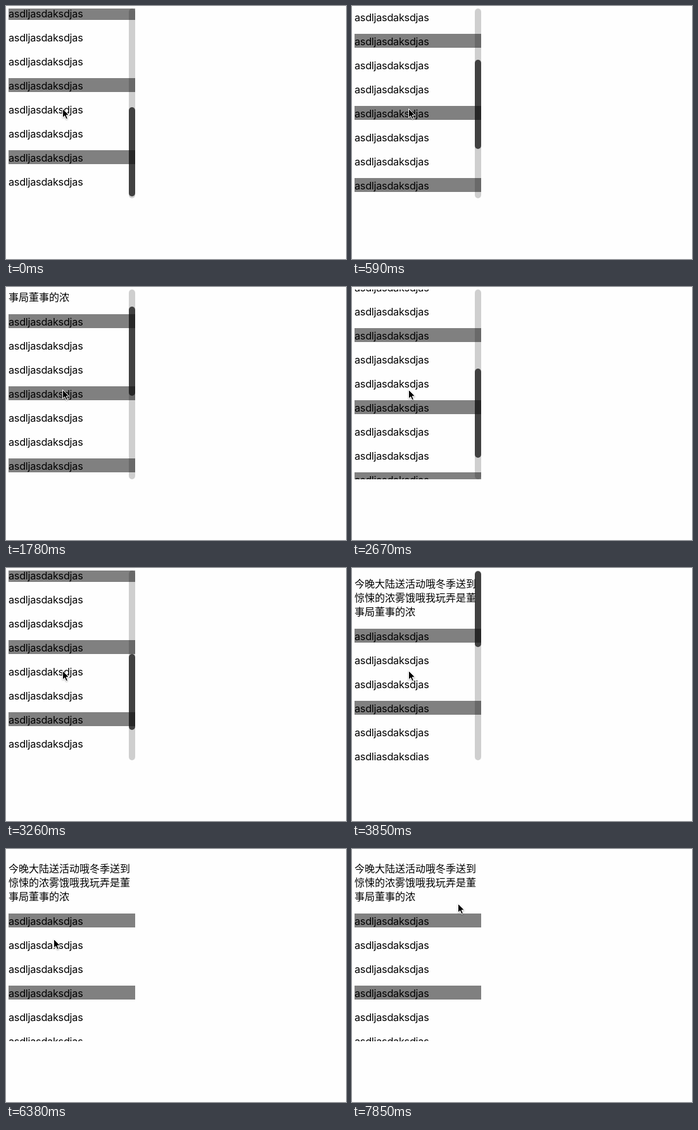
Animation of 537 by 400 pixels, one loop 8 s. Source, as an HTML page:

```html
<!DOCTYPE html>
<html lang="zh-CN">
<head>
<meta charset="utf-8">
<style>
  html, body { margin: 0; width: 100%; height: 100%; overflow: hidden; background: #fefefe; }
  #box { position: absolute; left: 4px; top: 4px; width: 200px; height: 300px; overflow: hidden; }
  #list { font: 16.3px/24px Inter, "Noto Sans CJK SC", "Noto Sans CJK", sans-serif; letter-spacing: -.017em; color: #000; padding-top: 16px; }
  p { margin: 0 0 16px; height: 22px; }
  p:first-child { height: 66px; font-size: 16px; line-height: 22px; letter-spacing: 0; }
  p:nth-child(3n + 2) { background: #808080; }
  #track, #thumb { position: absolute; top: 0; right: 0; width: 10px; border-radius: 5px; }
  #track { height: 300px; background: rgba(0, 0, 0, .185); }
  #thumb { background: rgba(17, 17, 17, .74); }
  #cursor { position: absolute; left: -2px; top: -2px; filter: drop-shadow(0 1px 1px rgba(0, 0, 0, .3)); }
</style>
</head>
<body>
<div id="box">
  <div id="list"><p>今晚大陆送活动哦冬季送到惊悚的浓雾饿哦我玩弄是董事局董事的浓</p></div>
  <div id="track"><div id="thumb"></div></div>
</div>
<svg id="cursor" width="16" height="22" viewBox="-2 -2 16 22">
  <path d="M.5 .5V14.6L3.7 11.6L6 16.8L8.4 15.8L6.2 10.7H10.6Z" stroke="#fff" stroke-width="1"/>
</svg>
<script>
// The screen updates in 54 even ticks per loop
const LOOP = 8000, TICKS = 54, LOAD = 22, HIDE = 39, BOTTOM = 330, ROWS = 17;
const [list, track, thumb, cursor] =
  ['list', 'track', 'thumb', 'cursor'].map(id => document.getElementById(id));

// Key points: [tick, value...]
const scroll = [
  [1, BOTTOM], [6, 67], [8, 0], [11, 0], [12, 59], [14, 200],
  [17, 200], [19, BOTTOM], [22, BOTTOM], [26, 6], [27, 0]
];
const pointer = [
  [28, 89, 162], [32, 361, 119], [37, 361, 119], [41, 75, 142], [43, 75, 142],
  [46, 203, 86], [47, 203, 86], [48, 193, 86], [51, 193, 86], [53, 167, 86]
];

for (let i = 0; i < ROWS; i++) {
  list.appendChild(document.createElement('p')).textContent = 'asdljasdaksdjas';
}

function between(keys, tick) {
  const b = keys.find(k => k[0] > tick) || keys.at(-1);
  const a = keys.findLast(k => k[0] <= tick) || b;
  const p = a === b ? 0 : (tick - a[0]) / (b[0] - a[0]);
  return a.slice(1).map((v, i) => Math.round(v + (b[i + 1] - v) * p));
}

function draw(now) {
  const tick = Math.floor((now % LOOP + 4) * TICKS / LOOP);
  const [y] = between(scroll, tick);
  const [px, py] = between(pointer, tick);
  const [size, travel] = tick < LOAD ? [141, 156] : [120, 132];
  const top = Math.max(0, Math.round((y - 3.5) / (BOTTOM - 3.5) * travel));
  list.style.transform = `translateY(${-y}px)`;
  thumb.style.height = `${size}px`;
  thumb.style.transform = `translateY(${top}px)`;
  track.style.visibility = tick < HIDE ? 'visible' : 'hidden';
  cursor.style.transform = `translate(${px}px, ${py}px)`;
  requestAnimationFrame(draw);
}
requestAnimationFrame(draw);
</script>
</body>
</html>
```
